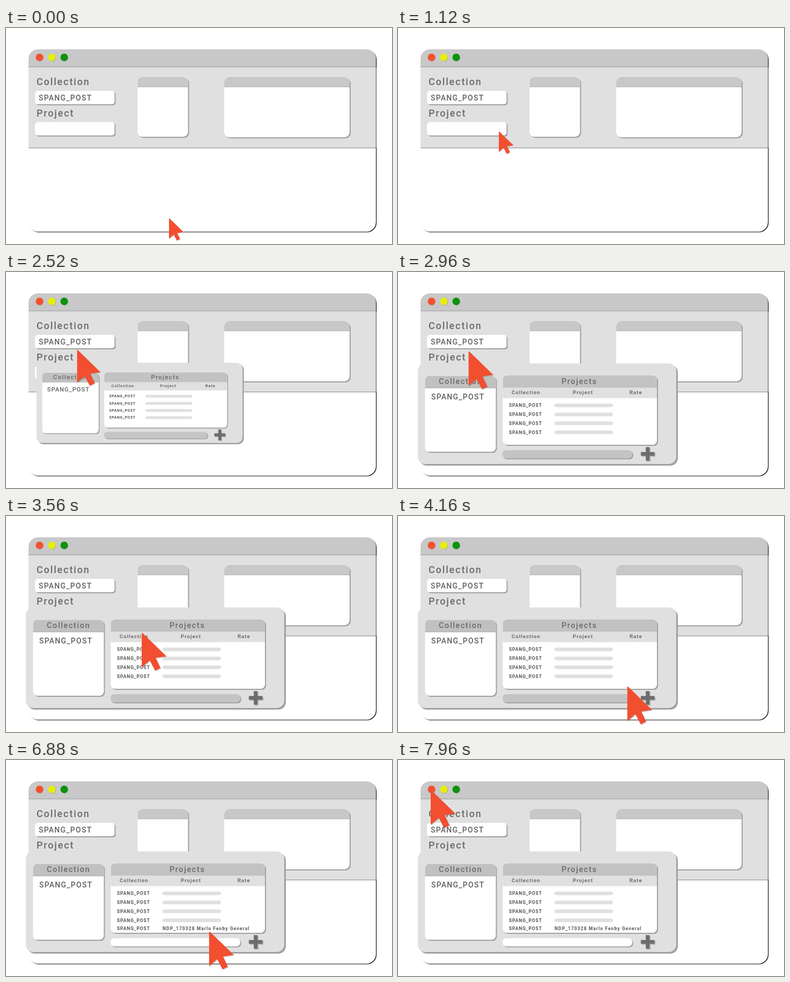
An HTML page that plays this animation: 720 px wide and 405 px high, repeating every 8000 ms.

```html
<!DOCTYPE html>
<html lang="en">
<head>
<meta charset="utf-8">
<title>Add a project</title>
<style>
html, body { margin: 0; width: 100%; height: 100%; overflow: hidden; background: #fff; }
svg { display: block; width: 720px; height: 405px; }
text { font-family: Roboto, "Liberation Sans", sans-serif; font-weight: 500; fill: #6a6a6a; white-space: pre; }
.title { font-size: 18px; letter-spacing: 1.85px; }
.value { font-size: 14px; letter-spacing: 1.25px; fill: #606060; }
.head { font-size: 14.5px; letter-spacing: 1.6px; }
.sub { font-size: 9.5px; letter-spacing: 1.05px; }
.row { font-size: 8.5px; letter-spacing: .87px; fill: #555; }
.name { letter-spacing: 1.05px; }
.input { font-size: 10px; letter-spacing: 1.2px; }
.sub, .row, .input { font-weight: 600; }
</style>
</head>
<body>
<svg id="stage" viewBox="0 0 720 405" xmlns="http://www.w3.org/2000/svg"></svg>
<script>
const LOOP = 8000, STEP = 40;
const COLLECTION = 'SPANG_POST';
const PROJECT = 'NDP_170328 Marlo Fenby General';
const BAR = '#c8c8c8', PANEL = '#e0e0e0', SHADE = '#a0a0a0';

const rect = (x, y, w, h, r, fill, extra = '') =>
  `<rect x="${x}" y="${y}" width="${w}" height="${h}" rx="${r}" fill="${fill}" ${extra}/>`;
const raised = (x, y, w, h, r, fill, depth = 2, extra = '') =>
  rect(x + depth, y + depth, w, h, r, SHADE) + rect(x, y, w, h, r, fill, extra);
const text = (x, y, cls, str, extra = '') =>
  `<text x="${x}" y="${y}" class="${cls}" ${extra}>${str}</text>`;
const topBar = (x, y, w, h, r, fill) =>
  `<path d="M${x} ${y + h}v${r - h}a${r} ${r} 0 0 1 ${r} ${-r}h${w - 2 * r}a${r} ${r} 0 0 1 ${r} ${r}v${h - r}z" fill="${fill}"/>`;
const card = (x, y, w, h, r, head, fill) =>
  raised(x, y, w, h, r, '#fff') + topBar(x, y, w, head, r, fill) +
  rect(x, y + head, w, 1, 0, '#b4b4b4');
const dot = (x, fill) =>
  `<circle cx="${x + .8}" cy="55.8" r="7" fill="#a8a8a8"/><circle cx="${x}" cy="55" r="7" fill="${fill}"/>`;

const mainWindow = () =>
  rect(43.2, 41, 648, 342, 18, '#111') +
  rect(42, 40, 648, 342, 18, '#fff') +
  rect(42, 73, 648, 152, 0, PANEL) +
  rect(42, 224, 648, 1.6, 0, '#a8a8a8') +
  rect(689.4, 74, 1.8, 150, 0, '#999') +
  topBar(42, 40, 648, 33, 18, BAR) +
  rect(42, 72, 648, 1.6, 0, '#adadad') +
  dot(62.5, '#f4502f') + dot(85.5, '#e4f000') + dot(108.5, '#089408') +
  text(57, 106.5, 'title', 'Collection') +
  raised(54, 118, 148.5, 25, 5, '#fff') +
  text(61, 136, 'value', COLLECTION) +
  text(57, 165.5, 'title', 'Project') +
  raised(54, 176.5, 148.5, 25, 5, '#fff') +
  card(245.5, 92, 94, 112, 9, 18, BAR) +
  card(407, 92, 234, 113, 10, 18, BAR);

const rowY = [253, 270, 286.5, 303.5];
const plus = (d, fill) =>
  `<path d="M${453 + d} ${341 + d}h25.5M${465.7 + d} ${328.3 + d}v25.5" stroke="${fill}" stroke-width="7"/>`;

const popup = () =>
  raised(37, 171.5, 482, 188.5, 14, PANEL, 3) +
  card(50.5, 195, 132, 142, 8, 22, '#c0c0c0') +
  text(76, 210, 'head', 'Collection') +
  text(62, 239, 'value', COLLECTION) +
  card(195.5, 194, 287.5, 130, 8, 22.5, '#c2c2c2') +
  rect(195.5, 217, 287.5, 19.5, 0, PANEL) +
  text(305, 210, 'head', 'Projects') +
  text(212, 229, 'sub', 'Collection') +
  text(326, 229, 'sub', 'Project') +
  text(432, 229, 'sub', 'Rate') +
  rowY.map(y => text(207, y, 'row', COLLECTION) + rect(292, y - 6.2, 109, 6.6, 3.3, PANEL)).join('') +
  `<g id="added">${text(207, 319, 'row', COLLECTION)}${text(292, 319, 'row name', PROJECT)}</g>` +
  raised(195, 334, 242, 15.5, 7, '#c4c4c4', 1.7, 'id="field"') +
  text(201, 346, 'input', [...PROJECT].map(c => `<tspan>${c}</tspan>`).join(''), 'id="typed"') +
  plus(1.8, '#b0b0b0') + plus(0, '#6c6c6c');

const ARROW = 'M0 1Q0 -1.5 2 .5L46 43.5L26 46.5L35 65.5L25 70.5L15 51.5L0 64.5Z';

const stage = document.getElementById('stage');
stage.innerHTML = mainWindow() + `<g id="popup">${popup()}</g>` +
  `<g id="cursor"><path d="${ARROW}" transform="translate(1.3 1.3)" fill="#777" opacity=".4"/>` +
  `<path d="${ARROW}" fill="#f24e30"/></g>`;

const get = id => document.getElementById(id);
const [popupEl, cursorEl, fieldEl, typedEl, addedEl] =
  ['popup', 'cursor', 'field', 'typed', 'added'].map(get);
const letters = [...typedEl.children];

const clamp = v => Math.min(1, Math.max(0, v));
const progress = (t, a, b) => clamp((t - a) / (b - a));
const ease = (t, a, b) => { const u = progress(t, a, b); return u * u * (3 - 2 * u); };
const mix = (a, b, k) => a + (b - a) * k;

// begin, end, then the pose reached: x, y, size
const moves = [
  [0, 1720, 143, 131, .59],
  [1720, 2760, 131, 149, 1],
  [2920, 4480, 464, 341, 1],
  [6680, 6920, 372, 320.5, 1],
  [6920, 7960, 61, 57, 1]
];

function cursorAt(t) {
  let pose = [304, 357, .59];
  for (const [a, b, ...next] of moves) {
    const k = ease(t, a, b);
    pose = pose.map((v, i) => mix(v, next[i], k));
  }
  return pose;
}

function draw(t) {
  const [x, y, size] = cursorAt(t);
  cursorEl.setAttribute('transform', `translate(${x} ${y}) scale(${size})`);

  const open = ease(t, 1930, 2760);
  popupEl.style.display = open > 0 ? '' : 'none';
  popupEl.setAttribute('transform', `translate(135 165) scale(${open}) translate(-135 -165)`);

  const grey = Math.round(mix(196, 255, ease(t, 4480, 5160)));
  fieldEl.setAttribute('fill', `rgb(${grey},${grey},${grey})`);

  const added = t >= 6240;
  const count = added ? 0 : progress(t, 5360, 5800) * letters.length;
  letters.forEach((el, i) => el.setAttribute('fill-opacity', clamp(count - i)));
  addedEl.style.display = added ? '' : 'none';
}

const start = performance.now();
function tick() {
  const t = (performance.now() - start) % LOOP;
  draw(Math.floor(t / STEP) * STEP);
  requestAnimationFrame(tick);
}
tick();
</script>
</body>
</html>
```
